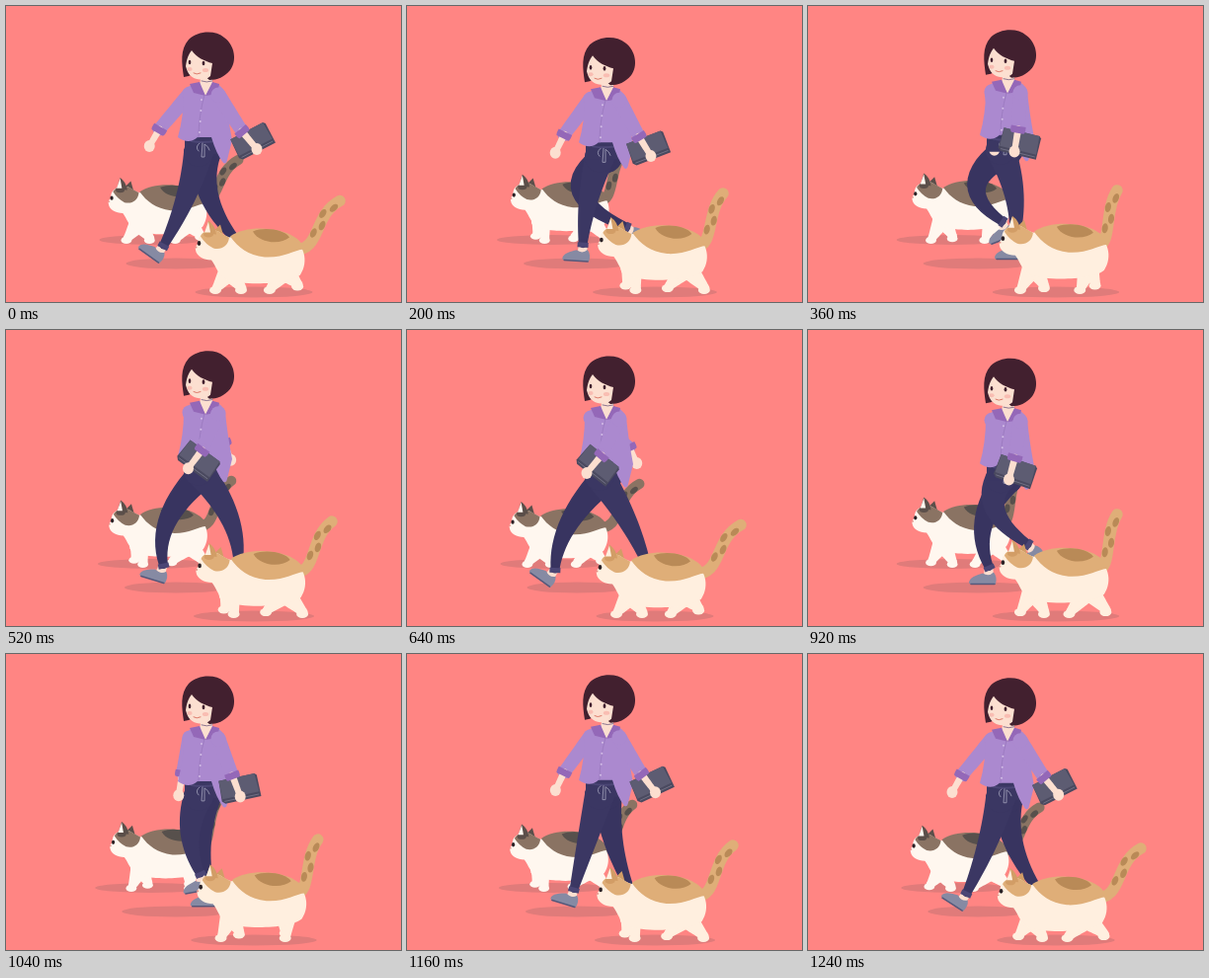
Write an HTML page with a canvas that moves like this. It is 400x300 px and loops after 1280 ms.

```html
<!DOCTYPE html>
<html lang="en">
<head>
<meta charset="utf-8">
<title>Walking with cats</title>
<style>
html, body { margin: 0; width: 100%; height: 100%; overflow: hidden; background: #ff8583; }
canvas { display: block; width: 400px; height: 300px; }
</style>
</head>
<body>
<canvas id="stage" width="400" height="300"></canvas>
<script>
const ctx = document.getElementById('stage').getContext('2d');
const LOOP = 1280, STEP = 40, TAU = Math.PI * 2;
const { sin, cos, max, tanh, atan2, hypot } = Math;

const C = {
  bg: '#ff8583', shadow: '#e07b7a', skin: '#fcdfd0', blush: '#f9bdb2', hair: '#42202f',
  shirt: '#ab89cf', trim: '#9468b8', seam: '#9878bd',
  pants: '#3b3763', pantsFar: '#383460', cuff: '#4b4675',
  shoe: '#868aa3', sole: '#55587a', book: '#5d5c72', bookEdge: '#4a495f'
};
const GINGER = { fur: '#ffefdf', coat: '#dfae78', spot: '#b98a57', ear: '#d29d66' };
const TABBY = { fur: '#fff7ef', coat: '#8a7363', spot: '#57504c', ear: '#5b4f4a' };

function fill(d, color) {
  ctx.fillStyle = color;
  ctx.fill(new Path2D(d));
}
function line(d, color, width) {
  ctx.strokeStyle = color;
  ctx.lineWidth = width;
  ctx.lineCap = 'round';
  ctx.stroke(new Path2D(d));
}
function oval(x, y, rx, ry, color) {
  ctx.fillStyle = color;
  ctx.beginPath();
  ctx.ellipse(x, y, rx, ry, 0, 0, TAU);
  ctx.fill();
}
function placed(x, y, angle, draw) {
  ctx.save();
  ctx.translate(x, y);
  ctx.rotate(angle);
  draw();
  ctx.restore();
}

// Tapered limb from a to b; bend pushes its middle sideways.
function limb([ax, ay], [bx, by], wa, wb, color, bend = 0) {
  const cx = (ax + bx) / 2 + 2 * bend, cy = (ay + by) / 2;
  const left = [], right = [];
  for (let u = 0; u <= 1.001; u += 1 / 16) {
    const v = 1 - u;
    const x = v * v * ax + 2 * u * v * cx + u * u * bx;
    const y = v * v * ay + 2 * u * v * cy + u * u * by;
    const dx = v * (cx - ax) + u * (bx - cx), dy = v * (cy - ay) + u * (by - cy);
    const r = (wa * v + wb * u) / 2 / (hypot(dx, dy) || 1);
    left.push([x - dy * r, y + dx * r]);
    right.unshift([x + dy * r, y - dx * r]);
  }
  fill('M' + [...left, ...right].join('L') + 'Z', color);
  oval(ax, ay, wa / 2, wa / 2, color);
  oval(bx, by, wb / 2, wb / 2, color);
  return atan2(by - cy, bx - cx);
}

// The body sinks after each footfall and rises in passing.
const bodyBob = a => 5.8 * sin(2 * a);

// a = 0 is the heel touching down in front.
function leg(a, hipX, centre, bend, color, dy) {
  const lift = max(0, -sin(a)), back = max(0, -cos(a - .6));
  const ankle = [
    centre - 41 * cos(a) + 14 * lift ** 3,
    242 - 23 * lift ** 3 - 3 * (1 - cos(a))
  ];
  const tilt = .62 * max(0, cos(a)) ** 4 - .95 * back;
  placed(...ankle, tilt, () => {
    fill('M-4,-2 L4,-2 L5,10 L-5,10Z', C.skin);
    fill('M-20,17 C-20,11 -12,9 -6,7 Q0,11 5,6 Q9,11 7,18 L-18,18Z', C.shoe);
    line('M-18,18 L6,18', C.sole, 1.5);
  });
  const hip = [hipX, 148 + dy];
  const angle = limb(hip, ankle, 30, 9, color, bend - 1.3 * dy - 20 * lift);
  placed(...ankle, angle, () => fill('M-1,-5.5 L4,-5.5 L4,5.5 L-1,5.5Z', C.cuff));
}

// 1 = near arm back, -1 = near arm forward; lingers at both ends.
const armSwing = a => tanh(1.6 * cos(a)) / tanh(1.6);

function forearm(cuff, hand) {
  const [cx, cy] = cuff, [hx, hy] = hand;
  limb(cuff, hand, 7, 6, C.skin);
  oval(hx, hy, 5.5, 6, C.skin);
  placed(cx, cy, atan2(hy - cy, hx - cx), () =>
    fill('M-3,-7.5 Q4,-8 4,-6 L4,6 Q4,8 -3,7.5Z', C.trim));
}

function farArm(a, dy) {
  const s = armSwing(a - .2), behind = max(0, -s);
  const cuff = [190 - 35 * s, 125 + dy - 6 * behind];
  const hand = [189 - 44 * s, 148 + dy - 6 * s * s - 7 * behind];
  limb([186, 89 + dy], cuff, 15, 13, C.shirt);
  forearm(cuff, hand);
}

function nearArm(a, dy) {
  const s = armSwing(a - .05), tilt = 5.5 - 33 * s;
  const cuff = [218 + 21 * s, 127 + dy];
  const hand = [218 + 36 * s, 150 + dy - 5 * s * s];
  limb([215, 90 + dy], cuff, 15, 13, C.shirt);
  placed(hand[0] + 2 + tilt * .23, hand[1] - 8, tilt * TAU / 360, () => {
    fill('M-19,-12 L18,-12 L20,-10 L20,12 L-17,12 L-20,9Z', C.bookEdge);
    fill('M-19,-12 L18,-12 L19,7 L-19,7Z', C.book);
    line('M-17,9.5 L18,9.5', '#77768a', .8);
  });
  forearm(cuff, hand);
}

function waist() {
  fill('M181,130 L217,130 L218,150 L181,150Z', C.pants);
  line('M188,137 Q198,139 212,137', C.cuff, 2);
  line('M196,139 Q191,143 195,147 M199,139 L198,153 L201,153 L201,140 Q205,142 206,146', '#a5a4bd', .8);
}

function torso() {
  fill(`M196,78 Q184,79 180,88 Q180,112 174,133 Q185,141 194,133 L208,133
    Q213,150 220,159 Q223,161 224,156 L229,136 Q224,110 222,88 Q218,79 209,78Z`, C.shirt);
  line('M201,90 Q195,112 195,133', C.seam, .8);
  for (let y = 95; y < 132; y += 11) oval(198 - (y - 95) * .06, y, 1, 1, '#d3bde6');
  fill('M198,68 L209,68 L209,79 L202,91 L196,80Z', C.skin);
  line('M198,76 Q203,78 209,76', '#8d7690', 1);
  fill('M196,77 L202,91 L190,88 L186,79Z', C.trim);
  fill('M209,77 L202,91 L214,89 L216,79Z', C.trim);
}

function head() {
  fill(`M180,72 C178,58 176,44 185,34 C194,25 212,24 221,32
    C232,40 234,56 227,65 C221,72 214,75 206,75 L195,66 L185,71Z`, C.hair);
  fill(`M182,61 C183,53 185,49 188,45 C193,52 201,56 209,58
    L207,71 Q203,75 196,74.5 C188,74 184,69 182,61Z`, C.skin);
  oval(186, 64, 2.6, 2, C.blush);
  oval(202, 65, 3.2, 2, C.blush);
  oval(186, 57, 1.3, 2.3, C.hair);
  oval(200, 58, 1.4, 2.3, C.hair);
  line('M190,68 Q193,70 197,68', '#d9705f', .9);
}

function girl(a) {
  const dy = bodyBob(a);
  leg(a + TAU / 2, 203, 191, -12, C.pantsFar, dy);
  leg(a, 195, 201, 4, C.pants, dy);
  farArm(a, dy);
  placed(0, dy, 0, () => {
    waist();
    torso();
    head();
  });
  nearArm(a, dy);
}

function tail(k, pal) {
  const p = [[290, 243], [306 + 14 * k, 244], [297 + 13 * k, 208], [310 + 28 * k, 187 + 6 * k]];
  const at = u => [0, 1].map(i => {
    const v = 1 - u;
    return v * v * v * p[0][i] + 3 * v * v * u * p[1][i] + 3 * v * u * u * p[2][i] + u * u * u * p[3][i];
  });
  line(`M${p[0]} C${p[1]} ${p[2]} ${p[3]}`, pal.coat, 11.5);
  for (let i = 0; i < 4; i++) {
    const u = .46 + .145 * i, [x, y] = at(u), [x2, y2] = at(u + .02);
    placed(x, y, atan2(y2 - y, x2 - x), () => oval(0, i % 2 ? 2.5 : -2.5, 5, 3, pal.spot));
  }
}

function paw(x, reach, phase, dy, color) {
  const px = x - reach * cos(phase);
  const py = 286 - 5 * max(0, -sin(phase));
  limb([x, 264 + dy], [px, py], 22, 9, color);
  oval(px - 1, py + 2, 6, 4, color);
}

function cat(x, y, size, pal, w) {
  const swing = cos(w), dy = 2 + 2.5 * swing;
  ctx.save();
  ctx.translate(x, y);
  ctx.scale(size, size);
  ctx.translate(-190 - swing, -292);

  for (const half of [0, TAU / 2]) {
    paw(226, 13, w + half, dy, pal.fur);
    paw(282, 20, w + half + TAU / 8, dy, pal.fur);
  }

  ctx.translate(0, dy);
  tail((1 + swing) / 2, pal);
  fill('M210,224 L217,217 L221,231Z', pal.ear);
  fill(`M195,231 C198,224 207,220 215,224 Q222,229 227,230 C240,220 270,219 288,229
    C302,237 307,254 298,268 C288,278 240,279 224,273 C214,268 213,259 208,253
    C200,253 193,249 192,243 Q191,239 194,237Z`, pal.fur);

  fill(`M227,229 C242,218 275,219 291,229 Q299,233 302,242
    C290,243 282,251 262,250 C245,248 235,240 227,229Z`, pal.coat);
  fill('M250,224 C262,219 282,222 287,230 C278,238 256,236 250,224Z', pal.spot);
  fill('M197,229 C199,224 207,220 215,224 Q222,228 226,230 C225,239 218,243 210,241 Q202,237 197,229Z', pal.coat);
  oval(205, 227, 5, 3, pal.ear);
  fill('M201,226 L205,213 Q212,218 213,227Z', pal.ear);
  fill('M201,225 L205,214 L207,225Z', pal.fur);
  oval(195.5, 236, 1.8, 2.4, '#2b2226');
  oval(192.5, 240, 1, .9, '#e58f86');
  ctx.restore();
}

function draw(t) {
  const stride = t / LOOP * TAU, trot = 2 * stride;
  const spread = -2.5 * cos(trot);
  ctx.fillStyle = C.bg;
  ctx.fillRect(0, 0, 400, 300);
  oval(147, 237, 55 + spread, 5, C.shadow);
  oval(172, 261, 53 + spread, 5.5, C.shadow);
  oval(251, 290, 62 + spread, 5.5, C.shadow);
  cat(103, 241, .9, TABBY, trot);
  girl(stride);
  cat(191, 292, 1, GINGER, trot);
}

function tick() {
  const t = performance.now() % LOOP;
  draw(Math.floor(t / STEP) * STEP);
  requestAnimationFrame(tick);
}
tick();
</script>
</body>
</html>
```
